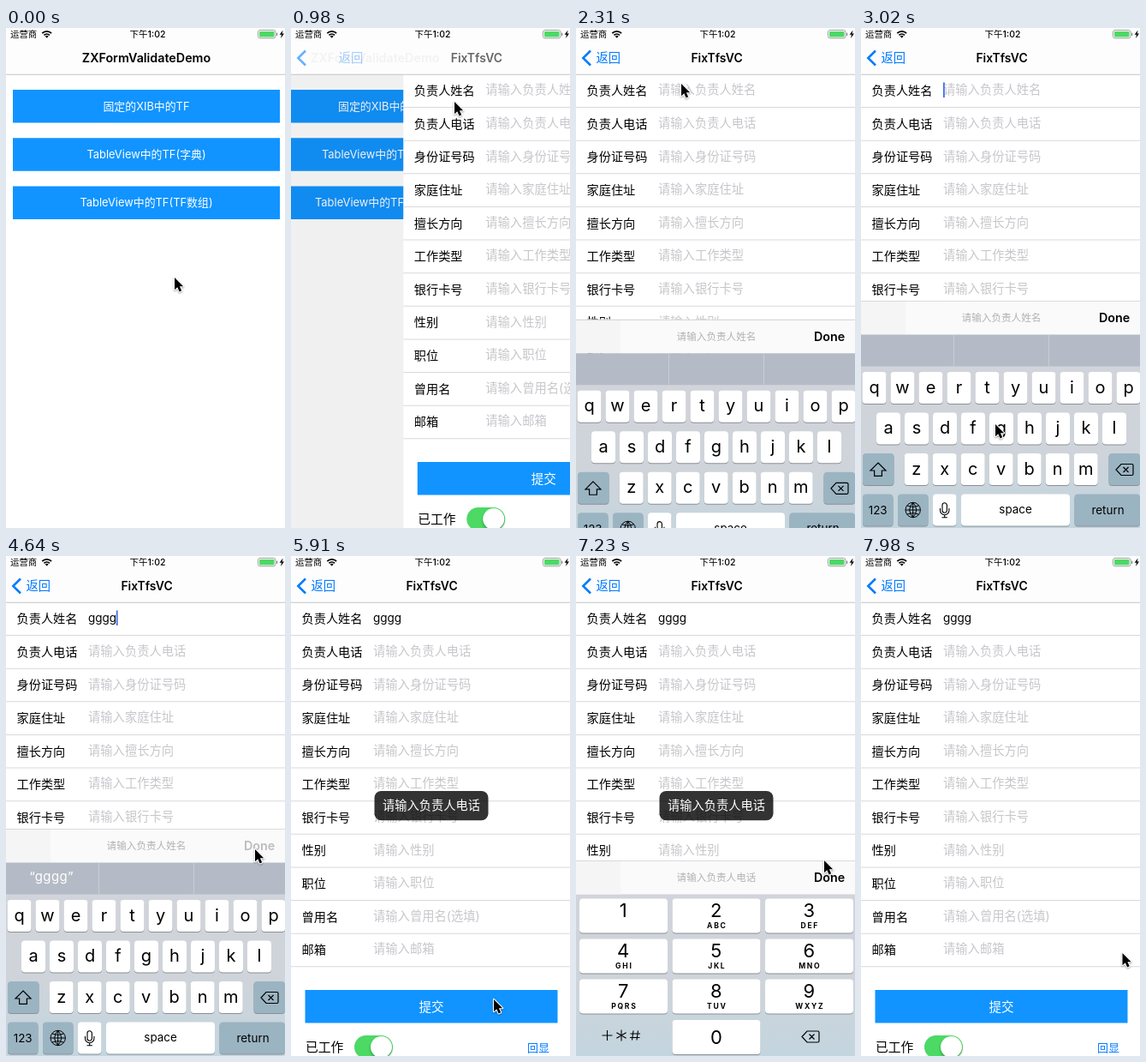
Write an HTML page with a canvas that moves like this. It is 326 by 583 pixels and loops after 8 s.

```html
<!DOCTYPE html>
<html lang="zh-CN">
<head>
<meta charset="utf-8">
<title>Form validation demo</title>
<style>
html, body { margin: 0; width: 100%; height: 100%; overflow: hidden; background: #fff; }
canvas { display: block; width: 326px; height: 583px; }
</style>
</head>
<body>
<canvas id="stage"></canvas>
<script>
const W = 326, H = 583, LOOP = 8000;
const FONT = 'Inter, "Noto Sans CJK SC", "Noto Sans CJK", sans-serif';
const BLUE = '#1194ff', LINK = '#007aff', LINE = '#d9d9dc', HINT = '#c7c7cc', GREEN = '#4cd964';
const FIELDS = ['负责人姓名', '负责人电话', '身份证号码', '家庭住址', '擅长方向', '工作类型',
  '银行卡号', '性别', '职位', '曾用名', '邮箱'];
const ROW = 38.62, TOP = 54;

// Bursts of motion: start, end, number of steps. The picture holds still in between.
const BURSTS = [[90, 630, 7], [800, 1590, 10], [2010, 2670, 8], [3020, 3020, 1], [3380, 4140, 10],
  [4230, 4640, 6], [5000, 5180, 3], [5450, 5590, 3], [5760, 5910, 3], [6320, 6500, 3],
  [6650, 7230, 8], [7230, 7410, 3], [7500, 7680, 3], [7980, 7980, 1]];

// Pointer path: time, x, y.
const POINTER = [[0, 197, 291], [350, 214, 190], [630, 191, 86], [1200, 191, 86], [1590, 123, 65],
  [2300, 123, 65], [2670, 189, 564], [3020, 157, 462], [3800, 157, 462], [4140, 291, 368],
  [4560, 291, 342], [4910, 291, 342], [5180, 286, 505], [5400, 286, 505], [5590, 237, 517],
  [6250, 237, 517], [6500, 246, 317], [6800, 200, 102], [6950, 200, 102], [7230, 290, 355],
  [7410, 292, 363], [7680, 292, 363], [7980, 305.5, 463]];

const canvas = document.getElementById('stage');
const ratio = window.devicePixelRatio || 1;
canvas.width = W * ratio;
canvas.height = H * ratio;
const c = canvas.getContext('2d');

const clamp = v => Math.max(0, Math.min(1, v));
const ramp = (t, a, b) => clamp((t - a) / (b - a));
const easeOut = p => 1 - (1 - p) ** 3;
const smooth = p => p * p * (3 - 2 * p);

function snap(t) {
  let held = 0;
  for (const [start, end, count] of BURSTS) {
    if (t < start) break;
    const step = (end - start) / (count - 1) || 1;
    held = start + Math.min(count - 1, Math.floor((t - start) / step + 1e-6)) * step;
  }
  return held;
}

function pointerAt(t) {
  const i = POINTER.findIndex(k => k[0] >= t);
  if (i <= 0) return POINTER[0].slice(1);
  const [t0, x0, y0] = POINTER[i - 1], [t1, x1, y1] = POINTER[i];
  const p = smooth(ramp(t, t0, t1));
  return [x0 + (x1 - x0) * p, y0 + (y1 - y0) * p];
}

// Text centred vertically on y.
function text(str, x, y, size, { color = '#000', align = 'left', weight = 400, rise = .37, spacing = 0 } = {}) {
  c.font = `${weight} ${size}px ${FONT}`;
  c.letterSpacing = spacing + 'px';
  c.textAlign = align;
  c.fillStyle = color;
  c.fillText(str, x, y + size * rise);
}

function box(x, y, w, h, color, r = 0) {
  c.fillStyle = color;
  c.beginPath();
  c.roundRect(x, y, w, h, r);
  c.fill();
}

function line(d, color = '#000', width = 1.2) {
  c.strokeStyle = color;
  c.lineWidth = width;
  c.stroke(new Path2D(d));
}

function fill(d, color = '#000') {
  c.fillStyle = color;
  c.fill(new Path2D(d));
}

function shifted(x, y, alpha, draw) {
  c.save();
  c.translate(x, y);
  c.globalAlpha *= alpha;
  draw();
  c.restore();
}

function button(label, x, y, w, h, size) {
  box(x, y, w, h, BLUE);
  text(label, x + w / 2, y + h / 2, size, { color: '#fff', align: 'center' });
}

function menuPage() {
  box(0, TOP, W, H - TOP, '#fff');
  ['固定的XIB中的TF', 'TableView中的TF(字典)', 'TableView中的TF(TF数组)']
    .forEach((label, i) => button(label, 8, 72 + i * 56.2, 312, 38.6, 12.9));
}

function formPage(name) {
  box(0, TOP, W, H - TOP, '#fff');
  FIELDS.forEach((label, i) => {
    const y = TOP + ROW * i;
    text(label, 12.5, y + 18.8, 14.2);
    if (i === 0 && name) text(name, 96, y + 18.3, 13.5);
    else text('请输入' + label + (label === '曾用名' ? '(选填)' : ''), 96, y + 18, 14.3, { color: HINT });
    box(0, y + ROW - .5, W, 1, LINE);
  });
  button('提交', 16.5, 506, 295, 38.6, 14.6);
  text('已工作', 17, 573, 14.8);
  box(74, 559, 45, 27, GREEN, 13.5);
  c.save();
  c.shadowColor = 'rgba(0,0,0,.3)';
  c.shadowBlur = 3 * ratio;
  c.shadowOffsetY = 2 * ratio;
  box(93, 560, 25, 25, '#fff', 12.5);
  c.restore();
  text('回显', 276, 573, 13, { color: LINK });
}

function header(push) {
  box(0, 0, W, TOP, '#fdfdfd');
  box(0, TOP - .3, W, 1, '#c4c4c6');
  const title = { align: 'center', weight: 600 };
  shifted(-110 * push, 0, clamp(1 - push * 1.6), () => text('ZXFormValidateDemo', 164, 35, 14.3, title));
  shifted(130 * (1 - push), 0, push, () => text('FixTfsVC', 164.5, 35, 13.9, title));
  shifted(0, 0, push, () => line('M17 26.5L8.3 35 17 43.5', LINK, 2.5));
  shifted(80 * (1 - push), 0, push * push, () => text('返回', 23.5, 34.7, 14.3, { color: LINK }));

  text('运营商', 5, 7, 10.4);
  text('下午1:02', 165.5, 7, 10.5, { align: 'center', weight: 500 });
  line('M42.3 6.2a7.4 7.4 0 0 1 10.8 0M44.4 8.4a4.6 4.6 0 0 1 6.6 0', '#000', 1.7);
  fill('M47.7 11.8l-2-2.2a2.9 2.9 0 0 1 4 0z');
  c.strokeStyle = '#888';
  c.lineWidth = .8;
  c.beginPath();
  c.roundRect(294.5, 2.5, 20.5, 9.4, 2.4);
  c.stroke();
  box(296, 4, 17.5, 6.4, GREEN, 1);
  box(316, 5.6, 1.2, 3.4, '#888', .6);
  fill('M323.6 2.5l-4 5.2h2.4l-1 4.2 4-5.4h-2.4z');
}

function key(x, y, w, h, color = '#fff') {
  box(x, y + 1, w, h, '#8b9096', 4);
  box(x, y, w, h, color, 4);
}

function accessory(y, label, pressed) {
  box(0, y, W, 39.5, '#fafafa');
  box(0, y, 52, 39.5, '#f5f5f5');
  box(0, y, W, .8, '#cfcfd2');
  text(label, 164, y + 19.8, 11.6, { color: '#b2b2b5', align: 'center' });
  text('Done', 278, y + 19.8, 14.3, { color: pressed ? '#bcbcbe' : '#000', weight: 600 });
}

function keyboardBack(y) {
  const g = c.createLinearGradient(0, y, 0, H);
  g.addColorStop(0, '#d1d4da');
  g.addColorStop(.55, '#ced4da');
  g.addColorStop(1, '#c3d5df');
  box(0, y, W, H - y, g);
}

function backspace(x, y) {
  shifted(x, y, 1, () => line('M-4-6.5H8.5Q10-6.5 10-5V5Q10 6.5 8.5 6.5H-4L-10 0ZM-1.5-3L4.5 3M4.5-3L-1.5 3'));
}

function letterKeyboard(typed, pressed) {
  const dark = '#9bb4c2', center = { align: 'center' };
  keyboardBack(394);
  accessory(318, '请输入负责人姓名', pressed);
  box(0, 357.5, W, 37, '#b5bbc6');
  box(108, 358, 1, 36, '#c9cdd5');
  box(219, 358, 1, 36, '#c9cdd5');
  if (typed) text(`“${typed}”`, 53.2, 374.5, 15, { color: '#fff', align: 'center', rise: .33, spacing: .4 });

  [['qwertyuiop', 15.5, 401], ['asdfghjkl', 32, 448.5], ['zxcvbnm', 64.7, 496]].forEach(([letters, x, y]) =>
    [...letters].forEach((letter, i) => {
      const cx = x + i * 33;
      key(cx - 14, y, 28, 37);
      text(letter, cx, y + 18.5, 20, { align: 'center', rise: .3 });
    }));
  key(2, 496, 36.5, 37, dark);
  key(289.5, 496, 36.5, 37, dark);
  line('M20 507l9 9h-4.6v6.4h-8.8V516H11z');
  backspace(308, 515);

  key(2, 543.5, 35.5, 37, dark);
  key(43, 543.5, 35.5, 37, dark);
  key(84, 543.5, 27.5, 37);
  key(117, 543.5, 127, 37);
  key(249.5, 543.5, 76.5, 37, dark);
  text('123', 19.7, 562, 13.4, center);
  text('space', 180.5, 562, 13.4, { align: 'center', rise: .32 });
  text('return', 288.5, 562, 13.4, { align: 'center', rise: .34 });
  line('M52 562a8.7 8.7 0 1 0 17.4 0a8.7 8.7 0 1 0-17.4 0ZM60.7 553.3v17.4M52 562h17.4' +
    'M60.7 553.3q-8 8.7 0 17.4q8-8.7 0-17.4M54 557q6.7 3 13.4 0M54 567q6.7-3 13.4 0', '#000', 1);
  line('M95 556.5a2.7 2.7 0 0 1 5.4 0v6a2.7 2.7 0 0 1-5.4 0zM92.5 560v2.5a5.2 5.2 0 0 0 10.4 0V560' +
    'M97.7 567.8v3M94.5 570.8h6.4', '#000', 1.1);
}

function numberKeyboard(pressed) {
  keyboardBack(394);
  accessory(355, '请输入负责人电话', pressed);
  const letters = ['', 'ABC', 'DEF', 'GHI', 'JKL', 'MNO', 'PQRS', 'TUV', 'WXYZ'];
  letters.forEach((word, i) => {
    const x = 4 + (i % 3) * 108.5, y = 399.5 + Math.floor(i / 3) * 47;
    key(x, y, 103, 40);
    text(i + 1, x + 51.2, y + 13.7, 22, { align: 'center' });
    text(word, x + 52.3, y + 31.5, 8.6, { align: 'center', weight: 700, spacing: 1.7 });
  });
  key(112.5, 541, 103, 40);
  text('0', 164, 560.5, 22, { align: 'center' });
  line('M30.5 559h12M36.5 553v12M53 552.5v13M47.4 555.8l11.2 6.5M58.6 555.8l-11.2 6.5' +
    'M67 553.5l-1.5 11M72.5 553.5l-1.5 11M63.5 557h11.5M63 561.5h11.5', '#000', 1.1);
  backspace(274, 560.5);
}

function caret(x, row) {
  box(x, 63.5 + row * ROW, 1.8, 17.5, '#426bf2');
}

function toast(alpha) {
  shifted(0, 0, alpha, () => {
    box(97.5, 274, 133, 34.3, 'rgba(0,0,0,.8)', 8);
    text('请输入负责人电话', 164, 290.7, 14.25, { color: '#fff', align: 'center' });
  });
}

function pointer(x, y) {
  const arrow = 'M0 0V14.2L3.3 11.2 5.6 16.4 8.2 15.3 5.9 10.2H10.2Z';
  c.save();
  c.translate(x, y);
  c.shadowColor = 'rgba(0,0,0,.35)';
  c.shadowBlur = 2 * ratio;
  c.shadowOffsetY = ratio;
  c.lineJoin = 'round';
  line(arrow, '#fff', 2.2);
  c.restore();
  shifted(x, y, 1, () => fill(arrow));
}

function draw(time) {
  const t = snap(time);
  const push = easeOut(ramp(t, 850, 1330));
  const typed = 'g'.repeat([3380, 3540, 3700, 3800].filter(at => t >= at).length);
  const letters = easeOut(ramp(t, 2050, 2480)) * (1 - easeOut(ramp(t, 4930, 5180)));
  const numbers = t >= 7980 ? 0 : easeOut(ramp(t, 6800, 7150));

  c.setTransform(ratio, 0, 0, ratio, 0, 0);
  c.clearRect(0, 0, W, H);
  if (push < 1) {
    shifted(-.3 * W * push, 0, 1, menuPage);
    box(0, TOP, W, H - TOP, `rgba(0,0,0,${.1 * push})`);
  }
  if (push > 0) shifted(W * (1 - push), 0, 1, () => formPage(typed));
  header(push);

  if (t >= 3020 && t < 4230 || t >= 4600 && t < 5000) caret(96 + typed.length * 8.2, 0);
  if (t >= 7500 && t < 7980) caret(96, 1);
  if (letters > 0) shifted(0, 265 * (1 - letters), 1, () => letterKeyboard(typed, t >= 4600));
  if (numbers > 0) shifted(0, 228 * (1 - numbers), 1, () => numberKeyboard(t >= 7580));
  toast(ramp(t, 5690, 5910) * (1 - ramp(t, 7420, 7680)));
  pointer(...pointerAt(t));
}

function tick() {
  draw(performance.now() % LOOP);
  requestAnimationFrame(tick);
}
tick();
</script>
</body>
</html>
```
